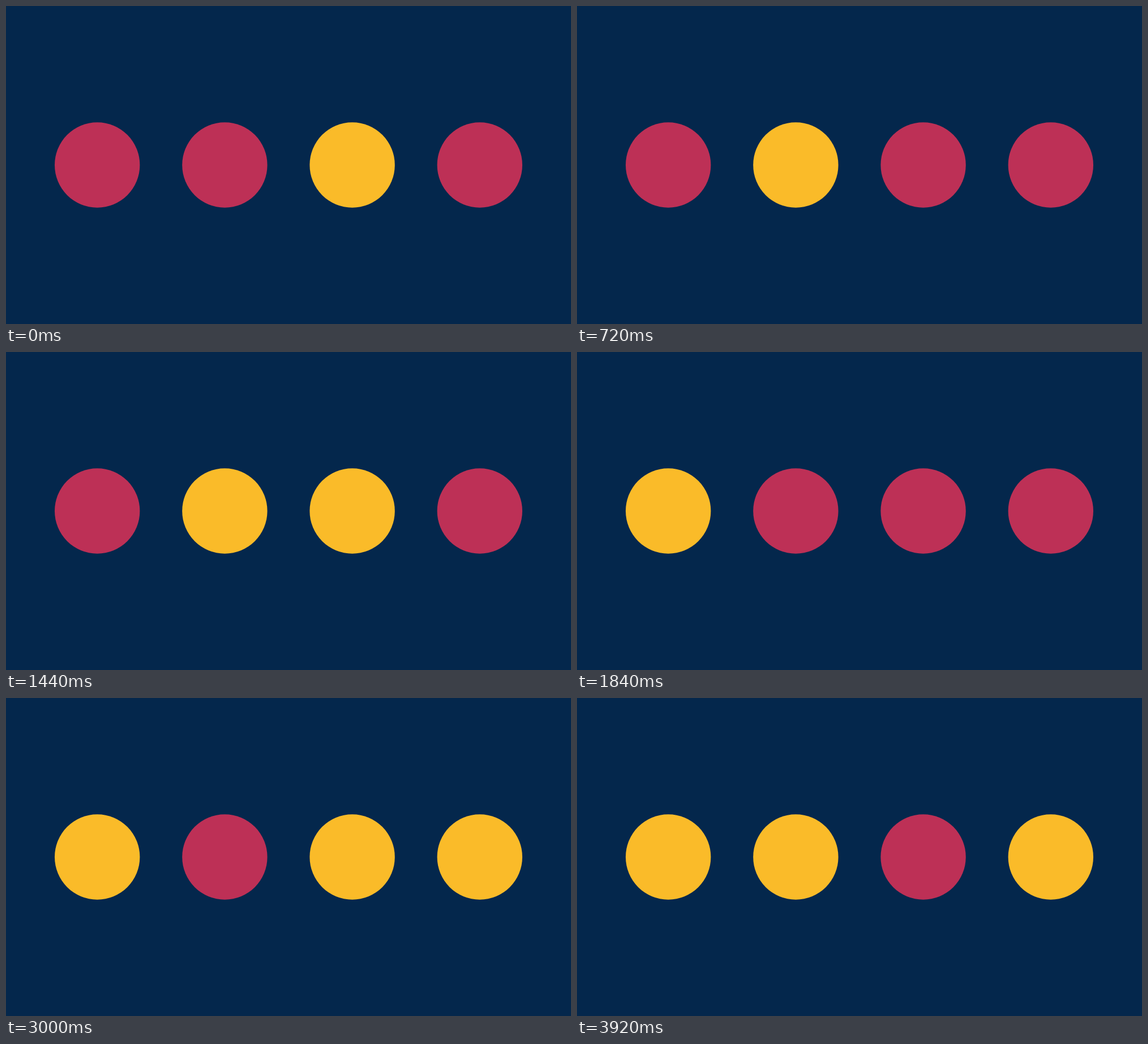
These frames come from a looping animation (998 px wide and 561 px high, 4 s). An HTML page:

```html
<!DOCTYPE html>
<html lang="en">
<head>
<meta charset="utf-8">
<title>Binary counter</title>
<style>
  html, body { margin: 0; width: 100%; height: 100%; overflow: hidden; background: #04274c; }
  svg { display: block; }
</style>
</head>
<body>
<svg width="998" height="561" viewBox="0 0 998 561">
  <circle cx="161.2" cy="280.5" r="75.2"/>
  <circle cx="386.4" cy="280.5" r="75.2"/>
  <circle cx="611.6" cy="280.5" r="75.2"/>
  <circle cx="836.8" cy="280.5" r="75.2"/>
</svg>
<script>
  const LOOP = 4000, STEP = 360, FIRST_STEP = 40, START_VALUE = 2;
  const ON = '#fabb29', OFF = '#bd3056';
  const dots = [...document.querySelectorAll('circle')];
  const startTime = performance.now();

  // Each dot is one bit of the counter, highest bit on the left.
  function draw(time) {
    const value = START_VALUE + Math.floor((time - FIRST_STEP) / STEP) + 1;
    dots.forEach((dot, i) => dot.setAttribute('fill', value >> (3 - i) & 1 ? ON : OFF));
  }

  function tick() {
    draw((performance.now() - startTime) % LOOP);
    requestAnimationFrame(tick);
  }
  tick();
</script>
</body>
</html>
```
